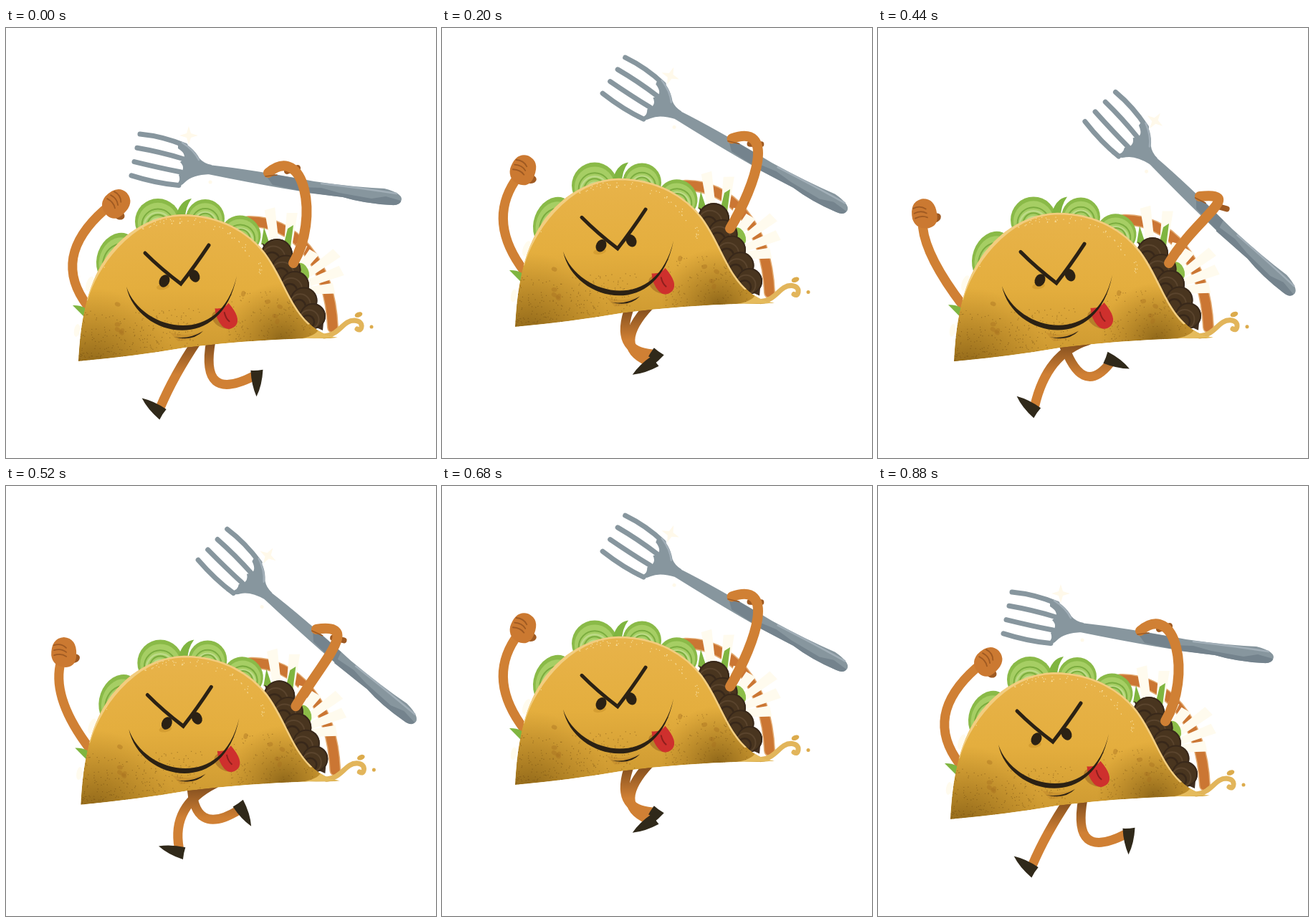
These frames come from a looping animation (600x600 px, 0.92 s). An HTML page with a canvas:

```html
<!DOCTYPE html>
<html lang="en">
<head>
<meta charset="utf-8">
<title>Running taco</title>
<style>
  html, body { margin: 0; width: 100%; height: 100%; overflow: hidden; background: #fff; }
  canvas { display: block; width: 600px; height: 600px; }
</style>
</head>
<body>
<canvas id="stage" width="600" height="600"></canvas>
<script>
const ctx = document.getElementById('stage').getContext('2d');
const { PI, sin, cos } = Math;
const STEP = 40, STEPS = 23, TURN = 11, RAD = PI / 180;
const SKIN = '#d08034', SKIN_DARK = '#9f5a22', INK = '#2b2114', SHOE = '#30291a';
const STEEL = '#87969e', STEEL_DARK = '#74838d', STEEL_LIGHT = '#a2afb8', GLINT = '#fff9ea';

const svg = d => new Path2D(d);
function oval(x, y, rx, ry = rx, turn = 0) {
  const path = new Path2D();
  path.ellipse(x, y, rx, ry, turn * RAD, 0, 2 * PI);
  return path;
}
function fill(path, color) { ctx.fillStyle = color; ctx.fill(path); }
function line(path, color, width) {
  ctx.strokeStyle = color;
  ctx.lineWidth = width;
  ctx.stroke(path);
}
function placed(x, y, turn, draw) {
  ctx.save();
  ctx.translate(x, y);
  ctx.rotate(turn * RAD);
  draw();
  ctx.restore();
}
function fade(gradient, ...colors) {
  colors.forEach((c, i) => gradient.addColorStop(i / (colors.length - 1), c));
  return gradient;
}

let seed = 7;
const rnd = () => (seed = seed * 16807 % 2147483647) / 2147483647;
function specks(count, place) {
  const path = new Path2D();
  for (let i = 0; i < count; i++) path.rect(...place(), 1.2, 1.2);
  return path;
}

const shell = svg('M101 465C103 430 107 385 125 346C146 300 190 262 245 260C300 260 340 285 362 314' +
  'C387 348 396 386 422 411C434 423 448 430 463 432Q450 434 420 433Q330 436 250 446Q180 458 101 465Z');
const gritLeft = specks(330, () => [101 + 170 * rnd() ** 1.4, 466 - 75 * rnd() ** 1.5]);
const gritRight = specks(200, () => [310 + 125 * rnd(), 436 - 70 * rnd() ** 1.4]);
const crumbs = specks(70, () => {
  const a = (200 + 140 * rnd()) * RAD, r = 0.9 + 0.07 * rnd();
  return [243 + 130 * r * cos(a), 383 + 123 * r * sin(a)];
});
const spots = [];
for (let i = 0; i < 10; i++) {
  const left = i % 2;
  spots.push(oval((left ? 120 : 330) + 60 * rnd(), (left ? 385 : 365) + 45 * rnd(), 4, 3, 180 * rnd()));
}

function drawLettuce(x, y, rx, ry, turn) {
  fill(oval(x, y, rx, ry, turn), '#8aba48');
  fill(oval(x, y + 2, rx * .88, ry * .88, turn), '#a6ce64');
  for (const k of [.7, .45]) {
    line(oval(x, y + 5, rx * k, ry * k, turn), '#7bad3f', 2);
    line(oval(x, y + 7, rx * k - 3, ry * k - 3, turn), '#bddb88', 2.5);
  }
}

function drawFilling() {
  const back = svg('M338 270C400 268 452 325 456 418');
  line(back, '#e3ab72', 16);
  line(back, '#cb7633', 13);
  for (let i = 0; i < 7; i++) {
    placed(385, 370, -98 + 15.5 * i, () => {
      const reach = i % 4 < 2 ? 118 - 6 * i : 72;
      fill(svg(`M20 -4L${reach} -8L${reach + 2} 7L20 4Z`), '#fffbee');
    });
  }
  fill(oval(117, 357, 5, 11, 20), '#fffbee');
  fill(oval(99, 422, 4, 9, 10), '#fffbee');
  fill(svg('M93 387Q110 386 120 400L112 406Z'), '#7fb540');
  fill(svg('M356 302L360 278L368 302ZM388 300L393 280L401 275L397 306Z'), '#7fb540');
  fill(oval(414, 340, 8, 13, -25), '#8cbd48');
  fill(svg('M357 300L385 315L444 400L442 422L420 412L380 350Z'), '#412e1f');
  for (let i = 0; i < 5; i++) {
    const x = 378 + 12.5 * i, y = 316 + 21.5 * i, r = 22 - i;
    fill(oval(x, y, r), '#49351f');
    line(oval(x, y, r - 1), '#38281a', 2);
    line(oval(x - 5, y + 5, r * .75), '#5a442d', 2);
    line(oval(x - 7, y + 8, r * .5), '#38281a', 2.5);
  }
  drawLettuce(156, 322, 29, 37, 20);
  drawLettuce(212, 270, 32, 32, 0);
  drawLettuce(278, 266, 27, 27, 0);
  drawLettuce(328, 288, 28, 26, 30);
  fill(svg('M236 266Q242 240 259 238Q250 250 250 266Z'), '#7fb540');
}

function drawShell() {
  line(svg('M444 430C466 428 470 408 486 408Q497 409 496 417Q495 423 490 420'), '#e2b55b', 7);
  fill(oval(492, 400, 5.5, 3.5, -20), '#dcab4c');
  fill(oval(510, 417, 2.5), '#dcab4c');
  ctx.save();
  ctx.clip(shell);
  fill(shell, fade(ctx.createLinearGradient(0, 260, 0, 465), '#e8b34a', '#e4ae3e', '#cb972f'));
  for (const [x, y, r] of [[120, 478, 115], [385, 436, 80]])
    fill(shell, fade(ctx.createRadialGradient(x, y, 0, x, y, r), 'rgba(112,78,14,.7)', 'rgba(150,105,20,0)'));
  spots.forEach(s => fill(s, 'rgba(165,110,30,.4)'));
  fill(gritLeft, 'rgba(100,65,15,.42)');
  fill(gritRight, 'rgba(100,65,15,.35)');
  fill(crumbs, '#f7dd9b');
  line(svg('M112 378C122 340 170 262 245 260C300 260 340 285 362 314C387 348 396 386 422 411'), '#f2cd80', 5);
  fill(svg('M408 434Q432 430 436 421L466 432Z'), '#e5bb5c');
  ctx.restore();
}

function drawFace() {
  fill(oval(219, 361, 9, 4, -10), 'rgba(200,145,40,.55)');
  fill(oval(221, 353, 7, 9, 28), INK);
  fill(oval(263, 346, 7, 9, -28), INK);
  line(svg('M194 314Q216 336 244 357Q263 333 283 303'), INK, 5);
  fill(oval(303, 407, 17, 11, 30), '#b5802a');
  placed(308, 402, 57, () => {
    fill(svg('M-18 8Q-10 -2 -14 -12Q14 -16 18 -3Q20 10 8 13Q-6 15 -18 8Z'), '#ce302d');
    line(svg('M-6 0Q2 3 8 1'), '#8e1f1d', 2);
  });
  fill(svg('M168 361C182 430 300 459 322 346C298 449 188 422 168 361Z'), INK);
  fill(svg('M229 425Q255 432 276 422Q262 436 240 437Z'), 'rgba(185,128,40,.4)');
  fill(svg('M234 431Q255 435 275 423Q260 438 234 431Z'), INK);
}

function drawFork() {
  fill(oval(285, 215, 2.5), GLINT);
  fill(svg('M255 137L258 147L268 150L258 153L255 163L252 153L242 150L252 147Z'), GLINT);
  for (let i = 0; i < 4; i++)
    line(svg(`M${187 - 4 * i} ${148 + 19.3 * i}Q${219 - 3 * i} ${151 + 22 * i} ${250 - 3 * i} ${164 + 18.5 * i}`), STEEL, 7);
  fill(svg('M240 157Q260 164 270 182Q276 189 287 191L284 204Q260 205 250 215Q243 223 230 222Q246 217 241 205' +
    'Q252 196 243 187Q256 178 240 168Z'), STEEL);
  fill(svg('M283 191Q340 197 430 214Q485 222 528 224Q552 230 552 239Q551 248 538 247Q500 245 470 236Q400 228 282 204Z'), STEEL);
  fill(svg('M412 222L440 223L465 230L510 238L530 235L551 241Q549 248 538 247Q500 245 470 236L412 229Z'), STEEL_DARK);
  fill(svg('M360 202L412 211L414 228L372 219Z'), STEEL_DARK);
  line(svg('M246 160Q262 170 269 184M440 217Q500 224 545 231'), STEEL_LIGHT, 2.5);
}

// The hand is fixed to the fork, the shoulder to the body.
function drawGripArm(fork, body) {
  const c = cos(fork.turn * RAD), s = sin(fork.turn * RAD);
  const held = (x, y) => `${fork.x + x * c - y * s} ${fork.y + x * s + y * c}`;
  line(svg(`M${held(112, 4)}L${held(127, -1)}`), SKIN_DARK, 8);
  line(svg(`M${body(401, 328)}C${body(438, 265)} ${held(136, -36)} ${held(86, 6)}`), SKIN, 14);
  line(svg(`M${held(82, 11)}L${held(98, 9)}`), SKIN_DARK, 1.6);
}

function drawFistArm(x, y, turn, body) {
  const c = cos(turn * RAD), s = sin(turn * RAD);
  line(svg(`M${body(114, 388)}Q${body(62, 320)} ${x - 6 * c - 18 * s} ${y - 6 * s + 18 * c}`), SKIN, 13);
  placed(x, y, turn, () => {
    fill(oval(14, 9, 8, 6, -20), SKIN_DARK);
    fill(svg('M-18 4Q-18 -20 0 -21Q18 -19 17 3Q17 20 2 21Q-16 20 -18 4Z'), '#cb7931');
    for (let i = 0; i < 3; i++) line(svg(`M-14 ${7 * i - 10}Q-4 ${7 * i - 13} 3 ${6 * i - 6}`), SKIN_DARK, 1.8);
  });
}

function drawLeg(hx, hy, kx, ky, fx, fy, turn) {
  const shade = fade(ctx.createLinearGradient(0, hy + 5, 0, hy + 48), '#85501f', SKIN);
  line(svg(`M${hx} ${hy}Q${kx} ${ky} ${fx} ${fy}`), shade, 13);
  placed(fx, fy, turn, () => fill(svg('M-28 6Q-12 -2 8 -4Q8 4 10 13Q-12 13 -28 6Z'), SHOE));
}

// p runs over one stride, 0 to TURN.
function draw(p) {
  const s = p / TURN;
  const dx = 5 * s * s, dy = -49 * sin(PI * s) ** 1.4, stretch = 1 + .014 * sin(PI * s / 1.6);
  const body = (x, y) => `${x + dx} ${y + dy}`;
  const inBody = fn => placed(dx, 440 + dy, 0, () => {
    ctx.scale(1, stretch);
    ctx.translate(0, -440);
    fn();
  });
  const fork = { x: 280 + 9.2 * p, y: 196 + dy - 31 * sin(PI * p / 13), turn: 35 * sin(p / 8) };
  const inFork = fn => placed(fork.x, fork.y, fork.turn, () => { ctx.translate(-280, -196); fn(); });

  ctx.fillStyle = '#fff';
  ctx.fillRect(0, 0, 600, 600);
  ctx.lineCap = 'round';
  const rise = s * s * (3 - 2 * s);
  drawLeg(267 - 10 * s, 436 + dy, 234 + 50 * s ** 3, 485 + 32 * s + dy,
    215 + 110 * sin(PI * s / 1.8), 530 - 62 * rise + dy, 40 - 17.5 * p);
  drawLeg(286 + 7 * s, 436 + dy, 270 - 40 * sin(PI * s / 1.5), 524 - 70 * s + dy,
    345 - 11.5 * p, 486 + 42 * sin(PI * s / 2) + dy, -87 + 11.7 * p);
  drawFistArm(154 - 8.1 * p, 245 + dy + 14 * s ** 3, 44 - 5 * p, body);
  inBody(drawFilling);
  inFork(drawFork);
  drawGripArm(fork, body);
  inBody(() => { drawShell(); drawFace(); });
}

// The stride swings out and back; both ends of the loop share one pose.
let start;
function tick(now) {
  start ??= now;
  const i = Math.floor((now - start) / STEP) % STEPS;
  draw(Math.min(i, 2 * TURN - i));
  requestAnimationFrame(tick);
}
draw(0);
requestAnimationFrame(tick);
</script>
</body>
</html>
```
